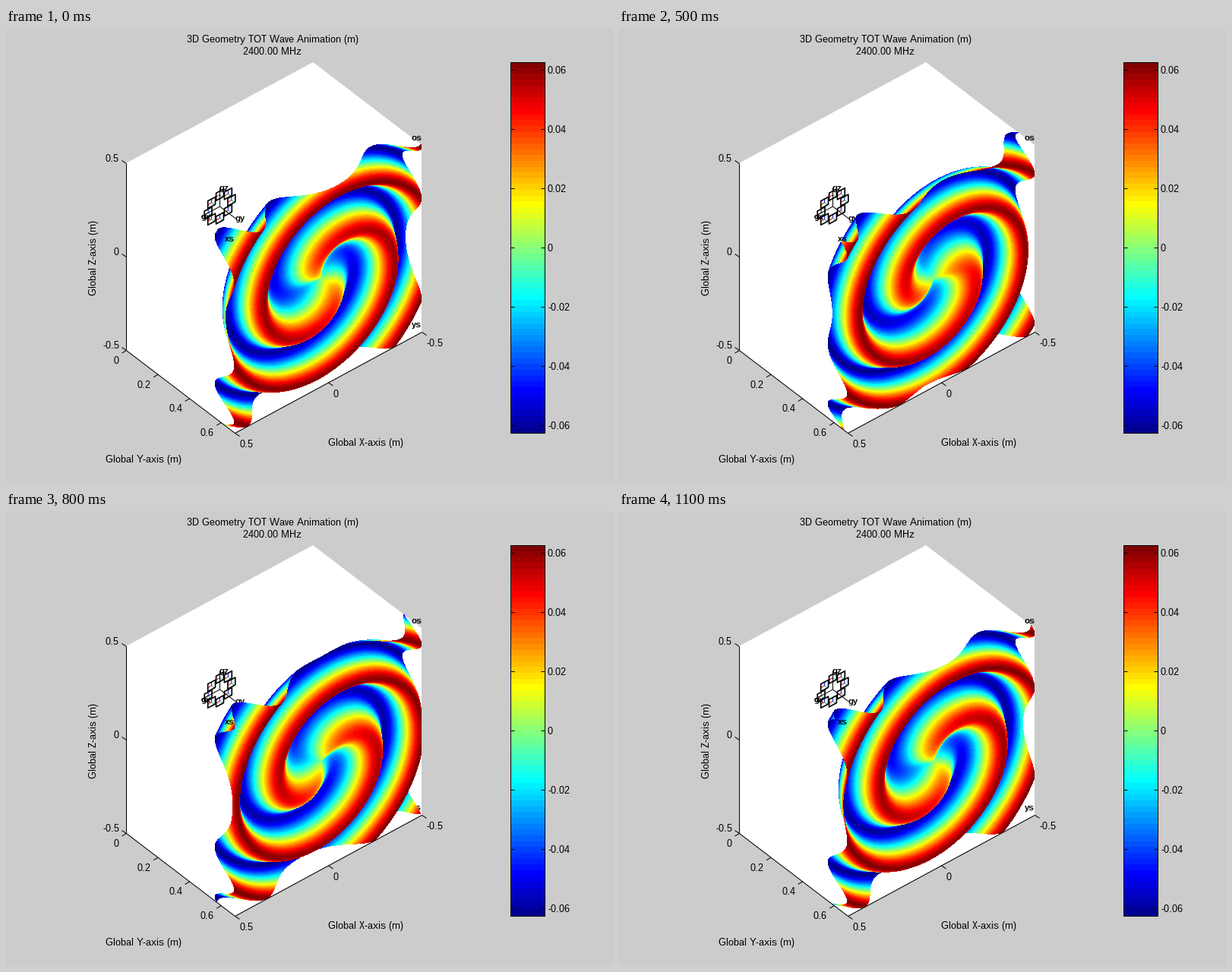
These frames come from a looping animation (799x599 px, 1.2 s). A matplotlib script:

```python
import numpy as np
import matplotlib.pyplot as plt
from matplotlib.animation import FuncAnimation
from matplotlib.collections import LineCollection
from matplotlib.patches import Polygon, Rectangle

W, H, DPI = 799, 599, 64
FRAMES = 12
WAVELEN = 0.125
AMP = WAVELEN / 2
PLANE_Y = 0.625
Y_MAX = PLANE_Y + AMP
SAMPLES = 1100
VIEW = np.array([0.494, 0.584, 0.643])  # towards the viewer

plt.rcParams.update({
    "font.family": "Liberation Sans",
    "text.hinting": "default",
    "text.hinting_factor": 1,
    "path.snap": False,
})


def px(size):
    return size * 72 / DPI


def project(x, y, z):
    """Orthographic view of the scene, in stage pixels."""
    return np.stack([281 - 246 * x + 208 * y,
                     234.5 + 133 * x + 158.5 * y - 246 * z], axis=-1)


def jet64():
    i = np.arange(1, 65)

    def ramp(mid):
        return np.clip((24 - np.abs(i - mid)) / 16, 0, 1)

    return np.stack([ramp(48), ramp(32), ramp(16), np.ones(64)], axis=1)


JET = (jet64() * 255).round().astype(np.uint8)

fig = plt.figure(figsize=(W / DPI, H / DPI), dpi=DPI, facecolor="0.8")
ax = fig.add_axes([0, 0, 1, 1])
ax.axis("off")


def picture(data, extent, z):
    return ax.imshow(data, extent=extent, interpolation="nearest",
                     aspect="auto", zorder=z)


def label(x, y, s, ha="left", size=13, z=6, **kw):
    return ax.text(x, y, s, ha=ha, va="baseline", fontsize=px(size),
                   color="black", zorder=z, **kw)


def lines(segs, color="black", width=1, z=6):
    """Strokes through pixel centres."""
    ax.add_collection(LineCollection(np.array(segs) + 0.5, colors=color,
                                     linewidths=px(width), zorder=z))


def draw_axes():
    corners = [(0.5, 0, 0.5), (-0.5, 0, 0.5), (-0.5, Y_MAX, 0.5),
               (-0.5, Y_MAX, -0.5), (0.5, Y_MAX, -0.5), (0.5, 0, -0.5)]
    box = [project(*c) for c in corners]
    ax.add_patch(Polygon(box, fc="white", ec="none", zorder=1))
    segs = [[box[0], box[5]], [box[5], box[4]], [box[4], box[3]]]

    for v in (0.5, 0, -0.5):
        p = project(v, Y_MAX, -0.5)
        segs.append([p, p + (6, 4)])
        label(p[0] + 6.5, p[1] + 19.5, f"{v:g}")
        p = project(0.5, 0, v)
        segs.append([p, p - (6, 4)])
        label(p[0] - 9, p[1] - 2, f"{v:g}", "right")
    for v in (0, 0.2, 0.4, 0.6):
        p = project(0.5, v, -0.5)
        segs.append([p, p + (-6, 3.5)])
        label(p[0] - 9, p[1] + 18, f"{v:g}", "right")
    lines(segs)

    label(350.5, 19, "3D Geometry TOT Wave Animation (m)", "center")
    label(350.5, 35, "2400.00 MHz", "center")
    label(424, 550, "Global X-axis (m)")
    label(131, 572, "Global Y-axis (m)")
    ax.text(116, 302, "Global Z-axis (m)", rotation=90, ha="center",
            va="center", fontsize=px(13), zorder=6)


def draw_colorbar():
    left, right, top, bottom = 664, 709, 45, 533
    picture(JET[::-1, None], (left, right + 1, bottom + 1, top), 2)
    ax.add_patch(Rectangle((left + 0.5, top + 0.5), right - left, bottom - top,
                           fill=False, ec="black", lw=px(1), zorder=6))
    segs = []
    for k in range(-3, 4):
        y = 289 - 78 * k
        segs += [[(left, y), (left + 5, y)], [(right - 5, y), (right, y)]]
        label(713, y + 5, f"{0.02 * k:.2f}" if k else "0")
    lines(segs)


def draw_array():
    """Ring of eight square elements around the global origin."""
    radius, half = 0.0625, 0.02
    squares, reds, greens, blues = [], [], [], []
    for t in np.arange(8) * np.pi / 4:
        x, z = radius * np.cos(t), radius * np.sin(t)
        squares.append([project(x + half * i, 0, z + half * j) for i, j in
                        ((-1, -1), (1, -1), (1, 1), (-1, 1), (-1, -1))])
        mid = project(x, 0, z)
        reds.append([mid, project(x + half, 0, z)])
        greens.append([mid, project(x, half, z)])
        blues.append([mid, project(x, 0, z + half)])
    for segs, color in ((reds, "red"), (greens, "#00c0a0"), (blues, "blue")):
        lines(segs, color, 1, 2)
    lines(squares, "black", 1.7, 2)

    origin = project(0, 0, 0)
    for name, tip in zip(("gx", "gy", "gz"), 0.1 * np.eye(3)):
        end = project(*tip)
        lines([[origin, end]], "black", 1, 2)
        label(end[0], end[1] + 4, name, size=11, z=2.5, weight="bold")


draw_axes()
draw_colorbar()
draw_array()

# Labels at the corners of the wave plane; each hides what lies behind it.
label_depth = np.full((H, W), np.inf)
for name, mx, mz in (("os", -0.5, 0.5), ("xs", 0.5, 0.5), ("ys", -0.5, -0.5)):
    tx, ty = project(mx, PLANE_Y, mz)
    label(tx - 0.5, ty + 3.5, name, size=11, z=4, weight="bold")
    cx, cy = int(tx), int(ty)
    label_depth[cy - 8:cy + 9, cx - 3:cx + 17] = VIEW @ (mx, PLANE_Y, mz)

# Dense samples of the plane, sorted from back to front.
grid = np.linspace(-0.5, 0.5, SAMPLES)
X, Z = (g.ravel() for g in np.meshgrid(grid, grid))
order = np.argsort(VIEW[0] * X + VIEW[2] * Z)
X, Z = X[order], Z[order]
FLAT = project(X, PLANE_Y, Z)
DEPTH = VIEW[0] * X + VIEW[1] * PLANE_Y + VIEW[2] * Z
STEP = project(0, 1, 0) - project(0, 0, 0)
INDEX = np.arange(X.size)

# Two-armed spiral wave running outwards, its centre a little off the axis.
u, w = -X - 0.0118, Z - 0.0118
rho = np.hypot(u, w)
TURNS = (np.hypot(rho, PLANE_Y) / WAVELEN + np.arctan2(w, u) / np.pi
         + 0.06 * (u + w) ** 2 + 0.30)
ENVELOPE = 1 - np.exp(-rho / 0.13)

stage = (0, W, H, 0)
blank = np.zeros((H, W, 4), np.uint8)
surface = picture(blank, stage, 3)
cover = picture(blank, stage, 5)  # parts in front of the corner labels

ax.set_xlim(0, W)
ax.set_ylim(H, 0)


def update(n):
    v = ENVELOPE * np.cos(2 * np.pi * (TURNS - n / FRAMES))
    col = (FLAT[:, 0] + AMP * STEP[0] * v).astype(int)
    row = (FLAT[:, 1] + AMP * STEP[1] * v).astype(int)

    # The nearest sample is written last and stays.
    top = np.full((H, W), -1)
    top[row, col] = INDEX
    hit = top >= 0
    seen = top[hit]

    level = np.clip((v[seen] + 1) * 32, 0, 63).astype(int)
    image = blank.copy()
    image[hit] = JET[level]
    surface.set_data(image)

    front = np.zeros((H, W), bool)
    front[hit] = DEPTH[seen] + VIEW[1] * AMP * v[seen] > label_depth[hit] + 0.002
    cover.set_data(np.where(front[..., None], image, blank))
    return surface, cover


anim = FuncAnimation(fig, update, frames=FRAMES, interval=100,
                     init_func=lambda: update(0), repeat=True,
                     repeat_delay=0, blit=False)
plt.show()
```
